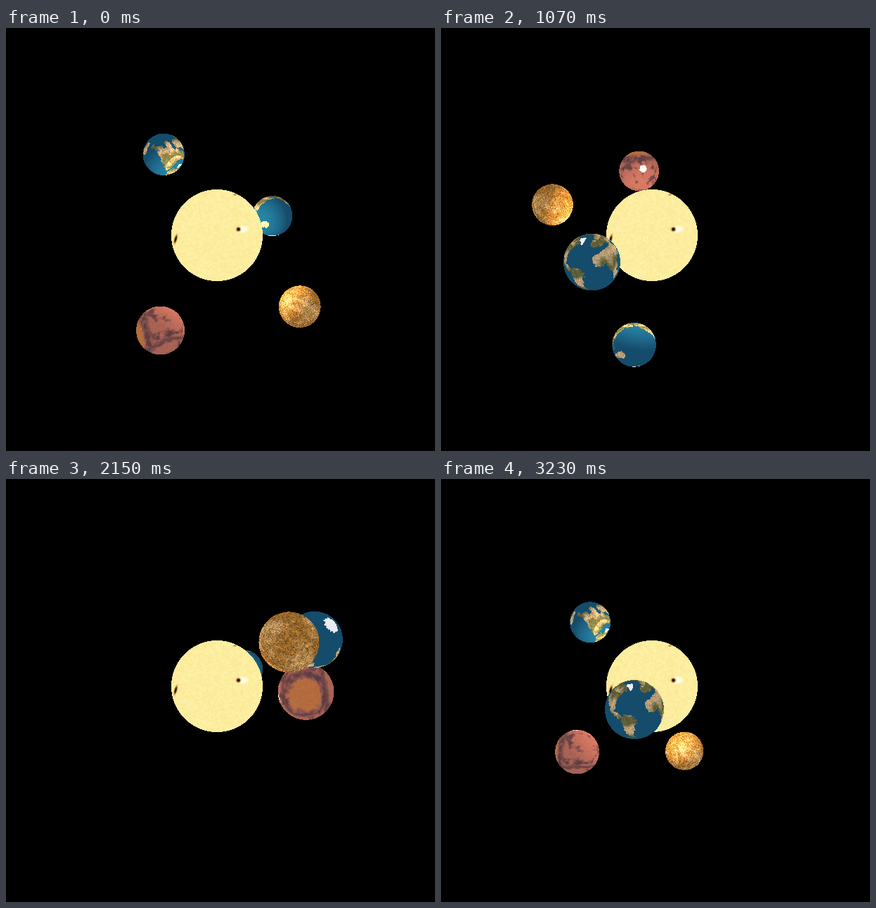
An HTML page with a canvas for the animation above (3.3 s loop, 610 by 600 pixels).

```html
<!DOCTYPE html>
<html lang="en">
<head>
<meta charset="utf-8">
<title>Planets</title>
<style>
html, body { margin: 0; width: 100%; height: 100%; overflow: hidden; background: #000; }
canvas { display: block; }
</style>
</head>
<body>
<canvas id="stage" width="610" height="600"></canvas>
<script>
const LOOP = 3300, STEPS = 43, CAMERA = 643, CX = 300, CY = 294, SUN = 65;
const W = 610, H = 600, TW = 720, TH = 360, RAD = Math.PI / 180;
const ctx = document.getElementById('stage').getContext('2d');
const image = ctx.createImageData(W, H);

const clamp = (x, lo = 0, hi = 1) => Math.max(lo, Math.min(hi, x));
const mix = (a, b, t) => a + (b - a) * t;
const blend = (a, b, t) => a.map((c, i) => mix(c, b[i], clamp(t)));
const dot = (a, b) => a[0] * b[0] + a[1] * b[1] + a[2] * b[2];
const cross = (a, b) => [a[1] * b[2] - a[2] * b[1], a[2] * b[0] - a[0] * b[2], a[0] * b[1] - a[1] * b[0]];
const unit = a => a.map(c => c / Math.hypot(...a));
const sum = (a, b, p, q) => a.map((c, i) => c * p + b[i] * q);

function hash(x, y) {
  const s = Math.sin(x * 127.1 + y * 311.7) * 43758.5453;
  return s - Math.floor(s);
}
function noise(x, y) {
  const i = Math.floor(x), j = Math.floor(y), u = x - i, v = y - j;
  return mix(mix(hash(i, j), hash(i + 1, j), u), mix(hash(i, j + 1), hash(i + 1, j + 1), u), v);
}
const fractal = (x, y) => noise(x, y) * 0.55 + noise(x * 2.1, y * 2.1) * 0.3 + noise(x * 4.3, y * 4.3) * 0.15;

// A surface is a rule from longitude and latitude to a colour, sampled once.
function globe(surface) {
  const data = new Uint8ClampedArray(TW * TH * 3);
  for (let y = 0; y < TH; y++) for (let x = 0; x < TW; x++) {
    data.set(surface((x + 0.5) * 360 / TW - 180, 90 - (y + 0.5) * 180 / TH), (y * TW + x) * 3);
  }
  return data;
}

// Depth in degrees inside a tapered stroke between two points of given width.
function inside(lon, lat, [x0, y0, r0], [x1, y1, r1]) {
  const c = Math.cos(lat * RAD), bx = (x1 - x0) * c, by = y1 - y0, ax = (lon - x0) * c, ay = lat - y0;
  const t = clamp((ax * bx + ay * by) / (bx * bx + by * by));
  return mix(r0, r1, t) - Math.hypot(ax - bx * t, ay - by * t);
}

const lands = {
  northAmerica: [[-112, 57, 23], [-94, 24, 6]],
  isthmus: [[-98, 20, 5], [-78, 8, 2]],
  southAmerica: [[-60, -4, 16], [-70, -48, 4]],
  sahara: [[-3, 18, 14], [44, 23, 14]],
  africa: [[22, 4, 16], [27, -28, 7]],
  eurasia: [[8, 52, 9], [104, 56, 24]],
  china: [[85, 42, 15], [108, 30, 13]],
  india: [[78, 25, 9], [78, 11, 3]],
  indonesia: [[102, 18, 6], [116, -3, 4]],
  siberia: [[110, 62, 12], [172, 65, 5]],
  australia: [[122, -25, 10], [143, -25, 11]]
};
const greenland = [[-42, 76, 7], [-44, 65, 4]];

const earth = globe((lon, lat) => {
  const rough = fractal(lon / 9, lat / 9) - 0.5;
  if (lat < -73 + rough * 14 || inside(lon, lat, ...greenland) + rough * 6 > 0) return [234, 236, 240];
  const height = Math.max(...Object.values(lands).map(ends => inside(lon, lat, ...ends))) + rough * 17;
  if (height < 0) return [21, 76, 107];
  const desert = 1.3 - Math.abs(Math.abs(lat) - 25) / 16 + (fractal(lon / 14 + 40, lat / 14) - 0.5) * 2.6;
  const grain = 0.75 + noise(lon, lat) * 0.5;
  return blend([94, 94, 56], [186, 158, 118], lat > 58 ? desert + 1.4 : desert).map(c => c * grain);
});

const rust = globe((lon, lat) => {
  const rough = fractal(lon / 16, lat / 12) - 0.5;
  if (lat > 79 + rough * 5) return [243, 228, 216];
  const plain = Math.hypot((lon + 52) * Math.cos(lat * RAD), lat - 8) + rough * 22;
  const base = blend([180, 108, 62], [168, 98, 84], (plain - 32) / 6);
  const rim = 1 - Math.abs(plain - 47) / 13, belt = 1 - Math.abs(lat + 42 + rough * 16) / 9;
  const patches = (fractal(lon / 24 + 7, lat / 15 + 3) - 0.58) * 7;
  const shade = Math.max(rim * 1.1 + rough, belt, plain > 40 ? patches : 0);
  const grain = 0.94 + noise(lon / 1.5, lat / 1.5) * 0.12;
  return blend(base, [92, 60, 64], shade * 0.9).map(c => c * grain);
});

const ochre = globe((lon, lat) => {
  const pale = (fractal(lon / 26, lat / 20) - 0.42) * 2.4;
  const speck = hash(Math.floor(lon), Math.floor(lat * 1.1)) * 0.65 + noise(lon / 3, lat / 3) * 0.45;
  return blend([150, 102, 42], [196, 158, 106], pale).map(c => c * (0.52 + speck * 0.85));
});

// Positive weight near a point of the sun's disc, in pixels from its centre.
const near = (x, y, px, py, rx, ry = rx) => clamp(1.6 - Math.hypot((x - px) / rx, (y - py) / ry));
function sunColor(x, y) {
  const mottle = noise(x / 2.4 + 99, y / 2.4 + 99) * 0.6 + hash(x, y) * 0.4;
  const plain = blend([249, 228, 140], [255, 246, 178], mottle);
  const bright = blend(plain, [255, 255, 236], near(x, y, 36, -9, 6, 4));
  const halo = Math.max(near(x, y, 30, -9, 3), near(x + y / 4, y, -58, 5, 2, 6), near(x, y, 25, -58, 2, 1));
  const core = Math.max(near(x, y, 30, -9, 2), near(x + y / 4, y, -58, 5, 1.2, 4));
  return blend(blend(bright, [200, 136, 52], halo), [34, 16, 6], core);
}

// roll and tilt set the orbit plane; north and prime are given in (radial, tangent, axis).
const planets = [
  { map: earth, size: 33, orbit: 141, roll: -9.2, tilt: 9.3, start: 137.5, rate: 13.64, glow: 0.95,
    north: [0.2, 0, -0.98], prime: [1, 0, 0], lon: -55 },
  { map: earth, size: 33, orbit: 170, roll: -93.6, tilt: 46, start: 128.6, rate: 8.84, glow: 0.95,
    north: [-0.96, -0.24, -0.02], prime: [0, 0, -1], lon: 140 },
  { map: rust, size: 33, orbit: 153, roll: -51.5, tilt: 37.6, start: 282.5, rate: 16.45, glow: 0.3,
    north: [-0.63, -0.57, -0.52], prime: [0, 0, -1], lon: 0 },
  { map: ochre, size: 32.6, orbit: 180, roll: 210.2, tilt: 27.3, start: 248, rate: 16.36, glow: 0.95,
    north: [0, 0, -1], prime: [1, 0, 0], lon: 0 }
];

function disc(cx, cy, r, shade) {
  for (let y = Math.floor(cy - r); y <= cy + r; y++) {
    for (let x = Math.floor(cx - r); x <= cx + r; x++) {
      const dx = (x + 0.5 - cx) / r, dy = (y + 0.5 - cy) / r, rest = 1 - dx * dx - dy * dy;
      if (rest >= 0) image.data.set(shade([dx, dy, Math.sqrt(rest)], x, y), (y * W + x) * 4);
    }
  }
}

const sunPixels = [];
disc(CX, CY, SUN, (d, x, y) => sunPixels[y * W + x] = sunColor(x - CX, y - CY));
const drawSun = () => disc(CX, CY, SUN, (d, x, y) => sunPixels[y * W + x]);

function place(p, step) {
  const angle = (p.start + p.rate * step) * RAD, roll = p.roll * RAD, tilt = p.tilt * RAD;
  const u = [-Math.sin(roll) * Math.sin(tilt), Math.cos(roll) * Math.sin(tilt), Math.cos(tilt)];
  const v = [Math.cos(roll), Math.sin(roll), 0], axis = cross(u, v);
  const radial = sum(u, v, Math.cos(angle), Math.sin(angle));
  const tangent = sum(u, v, -Math.sin(angle), Math.cos(angle));
  const world = d => unit(sum(sum(radial, tangent, d[0], d[1]), axis, 1, d[2]));
  const pos = radial.map(c => c * p.orbit);

  function draw() {
    const north = world(p.north), toward = world(p.prime);
    const prime = unit(sum(toward, north, 1, -dot(toward, north))), east = cross(prime, north);
    const s = CAMERA / (CAMERA - pos[2]);
    disc(CX + pos[0] * s, CY + pos[1] * s, p.size * s, d => {
      const lat = Math.asin(clamp(dot(d, north), -1, 1));
      const lon = Math.atan2(dot(d, east), dot(d, prime)) / RAD + p.lon;
      const x = Math.floor((lon + 540) % 360 / 360 * TW);
      const y = Math.min(TH - 1, Math.floor((0.5 - lat / Math.PI) * TH));
      const at = (y * TW + x) * 3, lit = Math.max(0, -dot(d, radial)) * p.glow;
      return [p.map[at] * (1 + lit), p.map[at + 1] * (1 + lit * 0.8), p.map[at + 2] * (1 + lit * 0.6)];
    });
  }
  return { z: pos[2], draw };
}

function render(step) {
  image.data.fill(0);
  for (let i = 3; i < image.data.length; i += 4) image.data[i] = 255;
  [{ z: 0, draw: drawSun }, ...planets.map(p => place(p, step))]
    .sort((a, b) => a.z - b.z)
    .forEach(body => body.draw());
  ctx.putImageData(image, 0, 0);
}

let shown = -1;
const begin = performance.now();
function tick() {
  const t = (performance.now() - begin) % LOOP;
  const step = Math.min(STEPS - 1, Math.floor(t / LOOP * STEPS + 0.1));
  if (step !== shown) render(shown = step);
  requestAnimationFrame(tick);
}
tick();
</script>
</body>
</html>
```
